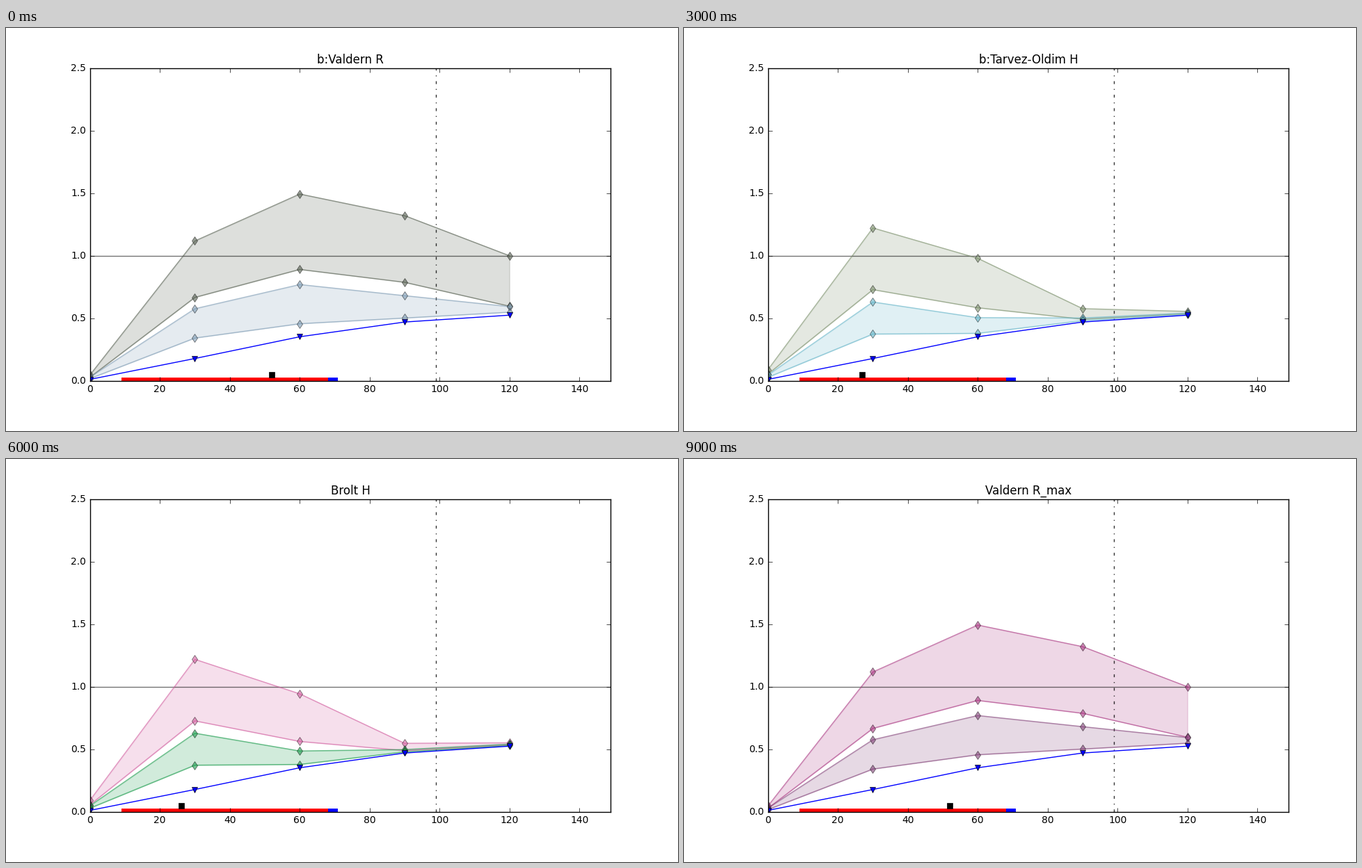
Animation of 966 by 580 pixels, one loop 10 s. Source, as a matplotlib script:

```python
import numpy as np
import matplotlib.pyplot as plt
from matplotlib.animation import FuncAnimation

plt.style.use("classic")
plt.rcParams.update({"font.family": "DejaVu Sans", "font.size": 10,
                     "figure.facecolor": "white", "savefig.facecolor": "white"})

DPI = 100
X = np.arange(0, 121, 30)
BASE = np.array([0.01, 0.177, 0.351, 0.469, 0.524])

# Peak curve at x = 30, 60, 90, 120 for a few radii
RADII = [11.7, 25.7, 30.5, 52, 57.5]
PEAKS = np.array([[0.978, 0.643, 0.533, 0.566],
                  [1.218, 0.927, 0.534, 0.550],
                  [1.235, 1.121, 0.691, 0.567],
                  [1.118, 1.494, 1.321, 1.000],
                  [1.073, 1.513, 1.407, 1.115]])

# title, outer colour, inner colour, radius and further marks
SCENES = [
    ("b:Valdern R", "#555f50", "#7d9bb4", [52]),
    ("b:Valdern B", "#0fc35a", "#c3877d", [57.5]),
    ("b:Tarvez-Oldim J", "#875a23", "#14ffe6", [25.7]),
    ("b:Tarvez-Oldim H", "#7a8f6a", "#64b4c8", [27]),
    ("Brolt J", "#69e1c8", "#dc8c37", [30.5]),
    ("Brolt B", "#a078b4", "#78a050", [28.3]),
    ("Brolt H", "#d25fa0", "#199b4b", [26.1]),
    ("Q7K_VN 1d", "#8cbed2", "#b45a96", [14, 47]),
    ("Q7K_VN 2d", "#a5e6e6", "#dc1ed2", [11.7, 47]),
    ("Valdern R_max", "#aa3782", "#824178", [52]),
]

fig = plt.figure(figsize=(966 / DPI, 580 / DPI), dpi=DPI)
ax = fig.add_axes([0.125, 0.125, 0.775, 0.775])


def peak(radius):
    start = 2.4 / radius
    return np.array([start] + [np.interp(radius, RADII, col) for col in PEAKS.T])


def scaled(top, share, lift):
    """A share of the peak curve that stays a little above the base line."""
    return np.maximum(share * top, BASE + lift * np.sqrt(top - BASE))


def band(high, low, color):
    ax.fill_between(X, low, high, facecolor=color, edgecolor=color,
                    alpha=0.2, linewidth=1)
    for y in (high, low):
        ax.plot(X, y, "d-", color=color, alpha=0.6)


def draw(i):
    title, outer, inner, marks = SCENES[i]
    top = peak(marks[0])
    ax.clear()
    ax.axhline(1, color="k", alpha=0.55)
    ax.axvline(99, color="k", alpha=0.8, ls="-.")
    band(top, scaled(top, 0.596, 0.07), outer)
    band(scaled(top, 0.515, 0.1), scaled(top, 0.305, 0.035), inner)
    ax.plot(X, BASE, "v-", color="blue")
    for start, end, color in ((9, 68.1, "red"), (68.1, 70.9, "blue")):
        ax.plot([start, end], [0, 0], color=color, lw=7, solid_capstyle="butt")
    ax.plot(marks, [0.05] * len(marks), "ks")
    ax.set_xlim(0, 149)
    ax.set_ylim(0, 2.5)
    ax.set_title(title)


anim = FuncAnimation(fig, draw, frames=len(SCENES), interval=1000,
                     init_func=lambda: draw(0), repeat=True, repeat_delay=0)
plt.show()
```
